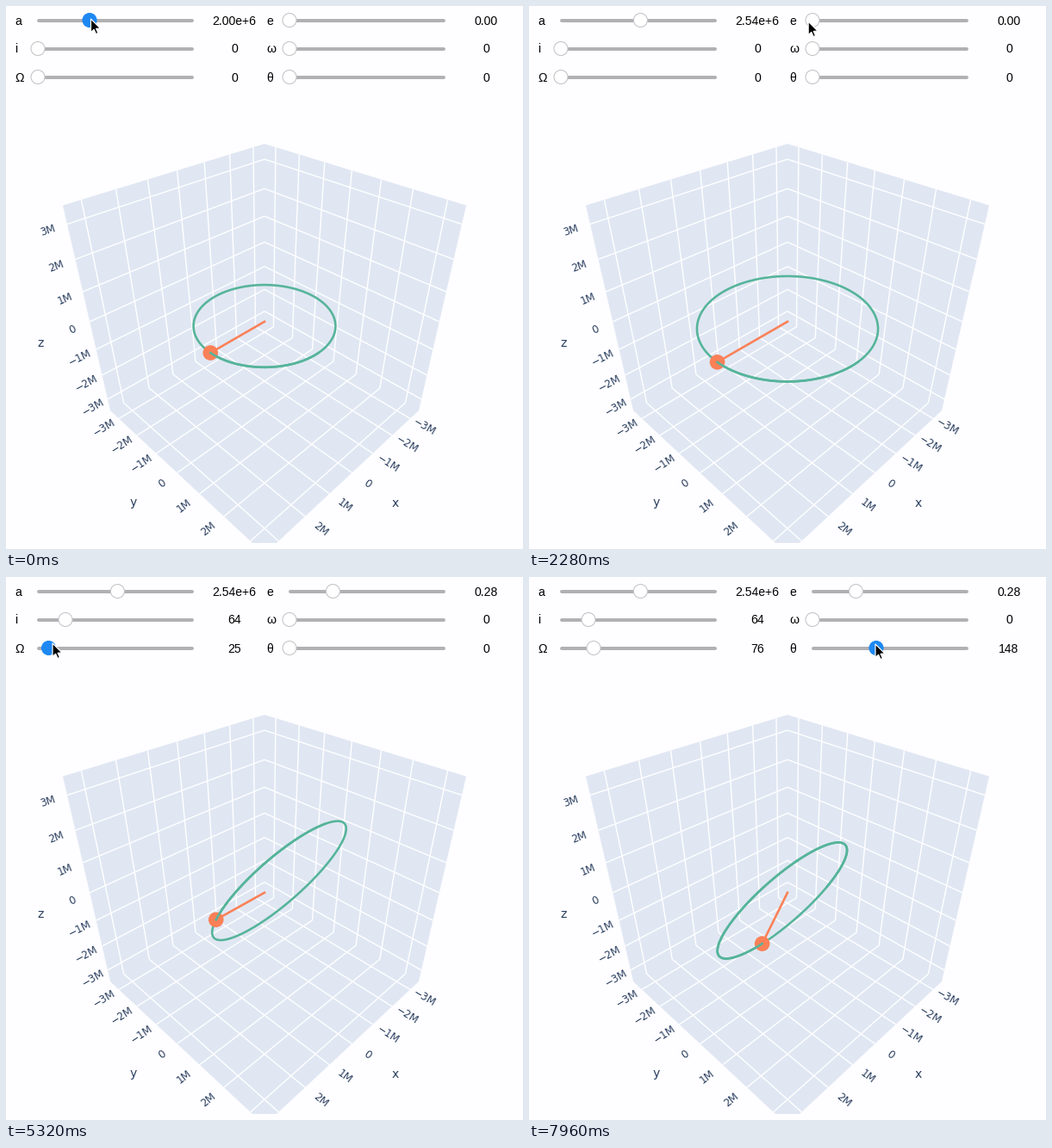
A matplotlib script for the animation above (8 s loop, 600 by 631 pixels).

```python
import numpy as np
import matplotlib.pyplot as plt
from matplotlib.animation import FuncAnimation
from matplotlib.collections import LineCollection
from matplotlib.patches import Circle, Polygon, Rectangle

W, H = 600, 631
STEP, FRAMES = 40, 200
PT = 0.72                     # points per pixel at 100 dpi
LAG = 120                     # the plot trails the sliders, ms

PAGE, WALL, INK = "#fefdff", "#e0e7f3", "#2a3f5f"
GREEN, CORAL, BLUE, TRACK = "#56b49a", "#fa8057", "#1e88f2", "#b1b0b3"

# camera
CX, CY, FOCAL = 300, 366.8, 621
DIST = 1.25 * np.sqrt(3)
HALF, RANGE = 0.5, 3.5
UNIT = HALF / RANGE

# (time, value) keys
KEYS = {
    "a": [(0, 2.0), (420, 1.18), (840, 2.05), (1040, 2.62), (1240, 2.54)],
    "e": [(2440, 0), (2840, 0.45), (3120, 0.315), (3240, 0.28)],
    "i": [(3760, 0), (4080, 115), (4320, 115), (4680, 64)],
    "Ω": [(5180, 0), (5200, 2), (5320, 25), (5640, 76)],
    "ω": [(0, 0), (1, 0)],
    "θ": [(6320, 0), (6400, 4), (6700, 130), (7240, 330),
          (7840, 190), (7960, 148), (8300, 60)],
}
POINTER = [
    (0, 98.5, 15), (420, 50, 17), (840, 103, 19), (1040, 136, 20),
    (1240, 131, 20.5), (1640, 131, 20.5), (2360, 331, 18), (2440, 331, 18),
    (2820, 414, 22), (3240, 384, 25), (3400, 384, 25), (3700, 38, 52),
    (3760, 38, 52), (4080, 91, 54), (4320, 91, 54), (4680, 67, 57),
    (4920, 67, 57), (5100, 37, 79), (5160, 37, 79), (5320, 54, 77),
    (5620, 78, 80), (5800, 78, 80), (6260, 328, 83), (6320, 330, 84),
    (6400, 341, 86), (6680, 400, 85), (7220, 497, 83), (7960, 402, 78),
    (8300, 360, 78),
]
ARROW = np.array([(0, 0), (0, 15.5), (3.6, 12.3), (6, 17.6), (8.4, 16.5),
                  (6.1, 11.3), (11, 11)])

# name: (column, row, low, high, format, active from, active to)
SLIDERS = {
    "a": (0, 0, 1, 4, "{:.2f}e+6", 0, 1700),
    "i": (0, 1, 0, 360, "{:.0f}", 3700, 4960),
    "Ω": (0, 2, 0, 360, "{:.0f}", 5080, 5840),
    "e": (1, 0, 0, 1, "{:.2f}", 2340, 3420),
    "ω": (1, 1, 0, 360, "{:.0f}", -2, -1),
    "θ": (1, 2, 0, 360, "{:.0f}", 6240, 9000),
}


def track(t, times, values):
    """Monotone cubic through the keys, flat at extremes and ends."""
    x, v = np.asarray(times, float), np.asarray(values, float)
    t = min(max(t, x[0]), x[-1])
    gap = np.diff(x)
    slope = np.diff(v) / gap
    m = np.zeros(len(x))
    for k in range(1, len(x) - 1):
        p, q = slope[k - 1], slope[k]
        if p * q > 0:
            m[k] = 2 * p * q / (p + q)
    k = min(np.searchsorted(x, t, side="right") - 1, len(gap) - 1)
    s, h = (t - x[k]) / gap[k], gap[k]
    return ((1 + 2 * s) * (1 - s) ** 2 * v[k] + s * (1 - s) ** 2 * h * m[k]
            + s * s * (3 - 2 * s) * v[k + 1] + s * s * (s - 1) * h * m[k + 1])


def value(name, t):
    return track(t, *zip(*KEYS[name]))


def depth(p):
    return DIST - np.sum(p, axis=-1) / np.sqrt(3)


def project(p):
    p = np.asarray(p, float)
    x, y, z = p[..., 0], p[..., 1], p[..., 2]
    k = FOCAL / depth(p)
    return np.stack([CX + k * (y - x) / np.sqrt(2),
                     CY - k * (2 * z - x - y) / np.sqrt(6)], axis=-1)


def orbit(theta, a, e, inc, turn):
    r = a * UNIT * (1 - e * e) / (1 + e * np.cos(theta))
    phi = theta + turn
    flat = r * np.sin(phi)
    return np.stack([r * np.cos(phi), flat * np.cos(inc),
                     flat * np.sin(inc)], axis=-1)


fig = plt.figure(figsize=(W / 100, H / 100), dpi=100, facecolor=PAGE)
ax = fig.add_axes([0, 0, 1, 1])
ax.set_xlim(0, W)
ax.set_ylim(H, 0)
ax.axis("off")


def draw_label(point, along, text):
    p, q = project([point, np.add(point, along)])
    angle = np.degrees(np.arctan2(p[1] - q[1], q[0] - p[0]))
    ax.text(*p, text, rotation=angle, rotation_mode="default", ha="center",
            va="center", fontsize=12 * PT, color=INK, family="DejaVu Sans")


def draw_box():
    h = HALF
    hull = [(-h, -h, h), (h, -h, h), (h, -h, -h),
            (h, h, -h), (-h, h, -h), (-h, h, h)]
    ax.add_patch(Polygon(project(hull), fc=WALL, ec="none", zorder=0))

    lines = []
    out = h + 0.075
    for n in range(-3, 4):
        g = n * UNIT
        lines += [
            [(g, -h, -h), (g, h, -h)], [(-h, g, -h), (h, g, -h)],
            [(g, -h, -h), (g, -h, h)], [(-h, -h, g), (h, -h, g)],
            [(-h, g, -h), (-h, g, h)], [(-h, -h, g), (-h, h, g)],
        ]
        text = f"{n}M".replace("-", "−") if n else "0"
        draw_label((out, -h, g), (-0.05, 0, 0), text)
        if n < 3:
            draw_label((out, g, -h), (-0.05, 0, 0), text)
            draw_label((g, out, -h), (0, 0.05, 0), text)
    ax.add_collection(LineCollection(project(lines), colors="white",
                                     linewidths=1.4 * PT, zorder=1))
    for x, y, text in [(40.5, 391.5, "z"), (148, 577, "y"), (452, 577.5, "x")]:
        ax.text(x, y, text, ha="center", va="center", fontsize=14 * PT,
                color=INK, family="DejaVu Sans")
    ax.add_patch(Rectangle((0, 624), W, 8, fc=PAGE, ec="none", zorder=6))


def draw_slider(name):
    col, row = SLIDERS[name][:2]
    left, y = 37 + 292 * col, 16.5 + 33 * row
    font = dict(fontsize=14 * PT, family="Liberation Sans", color="black")
    ax.text(left - 26.5, y + 5, name, **font)
    ax.plot([left + 1, left + 179], [y, y], color=TRACK, lw=4 * PT,
            solid_capstyle="round", zorder=7)
    knob = ax.add_patch(Circle((left, y), 8, lw=1.1 * PT, zorder=8))
    label = ax.text(left + 228, y + 5, "", ha="center", **font)
    return knob, label


draw_box()
widgets = {name: draw_slider(name) for name in SLIDERS}
ring, = ax.plot([], [], color=GREEN, lw=2.6 * PT, zorder=2)
radius, = ax.plot([], [], color=CORAL, lw=2.6 * PT, zorder=3)
body = ax.add_patch(Circle((0, 0), 8.8, fc=CORAL, ec="none", zorder=3))
front, = ax.plot([], [], color=GREEN, lw=2.6 * PT, zorder=4)
pointer = ax.add_patch(Polygon(ARROW, fc="black", ec="white", lw=1.2 * PT,
                               joinstyle="round", zorder=10))
SWEEP = np.linspace(0, 2 * np.pi, 361)


def update(frame):
    t = frame * STEP

    for name, (knob, label) in widgets.items():
        col, row, low, high, form, start, stop = SLIDERS[name]
        v = value(name, t)
        on = start <= t < stop
        knob.center = (37 + 292 * col + 180 * (v - low) / (high - low),
                       16.5 + 33 * row)
        knob.set_facecolor(BLUE if on else "white")
        knob.set_edgecolor(BLUE if on else "#c6c6ca")
        label.set_text(form.format(v))

    late = t - LAG
    shape = (value("a", late), value("e", late),
             np.radians(value("i", late)), np.radians(value("Ω", late)))
    path = orbit(SWEEP, *shape)
    spot = orbit(np.radians(value("θ", late)), *shape)
    inside = np.all(np.abs(path) <= HALF, axis=1)
    xy = project(path)
    xy[~inside] = np.nan
    near = xy.copy()
    near[depth(path) > depth(spot)] = np.nan
    ring.set_data(xy.T)
    front.set_data(near.T)
    end = project(spot)
    radius.set_data([CX, end[0]], [CY, end[1]])
    body.center = tuple(end)

    times, xs, ys = zip(*POINTER)
    pointer.set_xy(ARROW + (track(t, times, xs), track(t, times, ys)))
    return [ring, radius, body, front, pointer]


anim = FuncAnimation(fig, update, frames=FRAMES, interval=STEP, repeat=True,
                     repeat_delay=0, init_func=lambda: update(0), blit=False)
plt.show()
```
